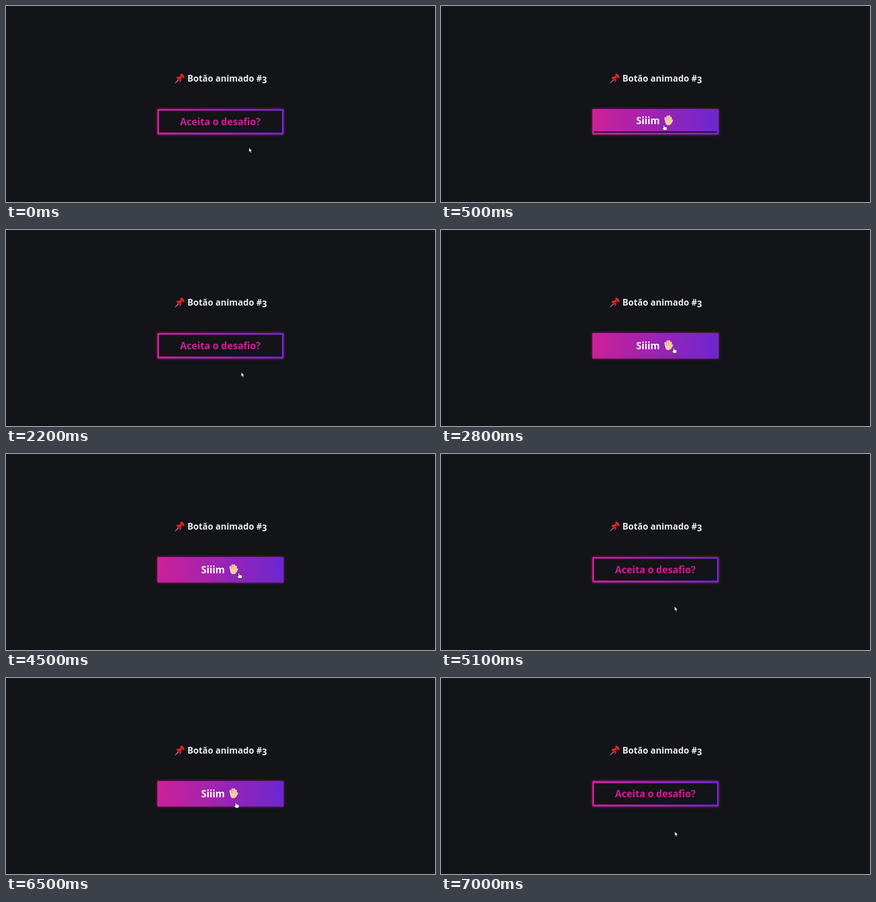
These frames come from a looping animation (768x350 px, 7100 ms). An HTML page:

```html
<!DOCTYPE html>
<html lang="pt-BR">
<head>
<meta charset="utf-8">
<title>Botão animado #3</title>
<style>
  html, body { margin: 0; width: 100%; height: 100%; overflow: hidden; background: #131418; }
  svg { display: block; width: 768px; height: 350px; }
  text { font: 700 17.2px "Open Sans", Lato, sans-serif; text-anchor: middle; }
  .title { font-size: 15.7px; fill: #ececec; }
  .ask { fill: #cf1d97; }
  .yes { fill: #fff; }
  .frame { filter: drop-shadow(0 0.5px 2px rgba(208, 32, 152, .75)); }

  /* Paused animations, scrubbed through --t in whole 100 ms ticks */
  .sheet, .cursor, .arrow, .hand {
    animation: 7100ms linear infinite paused;
    animation-delay: calc(var(--t, 0) * -1ms);
  }
  .sheet { animation-name: slide; animation-timing-function: ease; }
  .cursor { animation-name: move; }
  .arrow { animation-name: off-button; animation-timing-function: step-end; }
  .hand { animation-name: on-button; animation-timing-function: step-end; }

  @keyframes slide {
    0%, 1.76%, 21.13%, 32.82%, 72.39%, 79.37%, 100% { transform: translateY(-39px); }
    8.8%, 14.08%, 39.86%, 65.35%, 86.41%, 92.96% { transform: translateY(0); }
  }
  @keyframes on-button {
    0%, 14.08%, 65.35%, 92.96%, 100% { opacity: 0; }
    1.76%, 32.82%, 79.37% { opacity: 1; }
  }
  @keyframes off-button {
    0%, 14.08%, 65.35%, 92.96%, 100% { opacity: 1; }
    1.76%, 32.82%, 79.37% { opacity: 0; }
  }
  @keyframes move {
    0% { transform: translate(435px, 253px); }
    1.76% { transform: translate(419px, 231px); }
    4.23% { transform: translate(402px, 215px); }
    7.04%, 12.68% { transform: translate(399px, 212px); }
    14.08% { transform: translate(405px, 229px); }
    16.9% { transform: translate(417px, 275px); }
    19.72%, 25.35% { transform: translate(424px, 306px); }
    29.58% { transform: translate(422px, 273px); }
    32.82% { transform: translate(420px, 229px); }
    35.21% { transform: translate(418px, 216px); }
    39.43%, 42.25% { transform: translate(416.5px, 210px); }
    45.07%, 63.38% { transform: translate(417px, 212px); }
    65.35% { transform: translate(417px, 229px); }
    69.01% { transform: translate(418px, 262px); }
    73.24%, 74.65% { transform: translate(418px, 277px); }
    79.37% { transform: translate(412px, 229px); }
    81.69% { transform: translate(409.5px, 218px); }
    84.51%, 90.14% { transform: translate(409px, 215px); }
    92.96% { transform: translate(414px, 229px); }
    95.77% { transform: translate(417.5px, 271px); }
    98.59%, 100% { transform: translate(418.5px, 274px); }
  }
</style>
</head>
<body>
<svg viewBox="0 0 768 350">
  <defs>
    <linearGradient id="neon" gradientUnits="userSpaceOnUse" x1="271" y1="0" x2="497" y2="0">
      <stop offset="0" stop-color="#cd2097"/>
      <stop offset="1" stop-color="#6c27d0"/>
    </linearGradient>
    <clipPath id="inside"><rect x="274" y="187" width="220" height="39"/></clipPath>
  </defs>

  <rect width="768" height="350" fill="#131418"/>

  <!-- pushpin -->
  <g transform="translate(311 129.5) rotate(45)">
    <path d="M-.8 3H.8L.3 12H-.3Z" fill="#9aa3ab"/>
    <path d="M-5.6 3.4Q-5.4-.4-2.4-1.2L-2.2-5.4H2.2L2.4-1.2Q5.4-.4 5.6 3.4Q0 5-5.6 3.4Z" fill="#c4151f"/>
    <path d="M-2.2-5.4H-.4L-.6-1-3.6 2.6Q-4-.4-2.4-1.2Z" fill="#ea3f46"/>
    <ellipse cy="-6.8" rx="4.8" ry="2.3" fill="#dc2430"/>
    <path d="M-4.6-6Q0-3.2 4.6-6Q0-1.6-4.6-6Z" fill="#8f0e18"/>
  </g>
  <text class="title" x="396" y="135">Botão animado #<tspan dy="3">3</tspan></text>

  <!-- button -->
  <rect class="frame" x="271" y="184" width="226" height="45.5" rx="1" fill="url(#neon)"/>
  <rect x="274" y="187" width="220" height="39" fill="#131418"/>
  <text class="ask" x="383.7" y="213">Aceita o desafio?</text>
  <g clip-path="url(#inside)">
    <g class="sheet">
      <rect x="274" y="187" width="220" height="39" fill="url(#neon)"/>
      <text class="yes" x="370.5" y="212.6">Siiim</text>
      <g fill="none" stroke="#f3d2a6" stroke-width="3.1" stroke-linecap="round">
        <path d="M401.5 201.5L402.6 208M405 198.6L405.4 207M408.6 198.2V207M411.7 200.8L411.4 208M410.6 211.4L414 205.8"/>
        <path d="M401 206H413L411.4 211.4Q410.6 214.6 407 214.6Q403.2 214.6 402.2 211.4Z" fill="#f3d2a6" stroke="none"/>
        <path d="M403.5 201.5L404 206.4M407 200V206.2M410.2 201V206.4" stroke="#d2a274" stroke-width=".6"/>
      </g>
    </g>
  </g>

  <g class="cursor" fill="#fff" stroke="#08080a" stroke-width=".6" stroke-linejoin="round">
    <path class="arrow" d="M0 0V8L1.8 6.5 3.1 9.5 4.5 8.9 3.2 6H5.6Z"/>
    <path class="hand" d="M-1 .7Q0-.6 1 .7V3.7Q2 3.1 2.6 4Q3.5 3.5 4.1 4.4Q5.5 4.1 5.6 5.4V7.3L4.7 10H-.4L-3 6.6Q-3.3 5.2-2 5.5L-1 6.4Z"/>
  </g>
</svg>
<script>
  const LOOP = 7100, TICK = 100;
  const root = document.documentElement;

  function draw(now) {
    const t = Math.floor((now % LOOP) / TICK) * TICK;
    root.style.setProperty('--t', t);
    requestAnimationFrame(draw);
  }
  requestAnimationFrame(draw);
</script>
</body>
</html>
```
